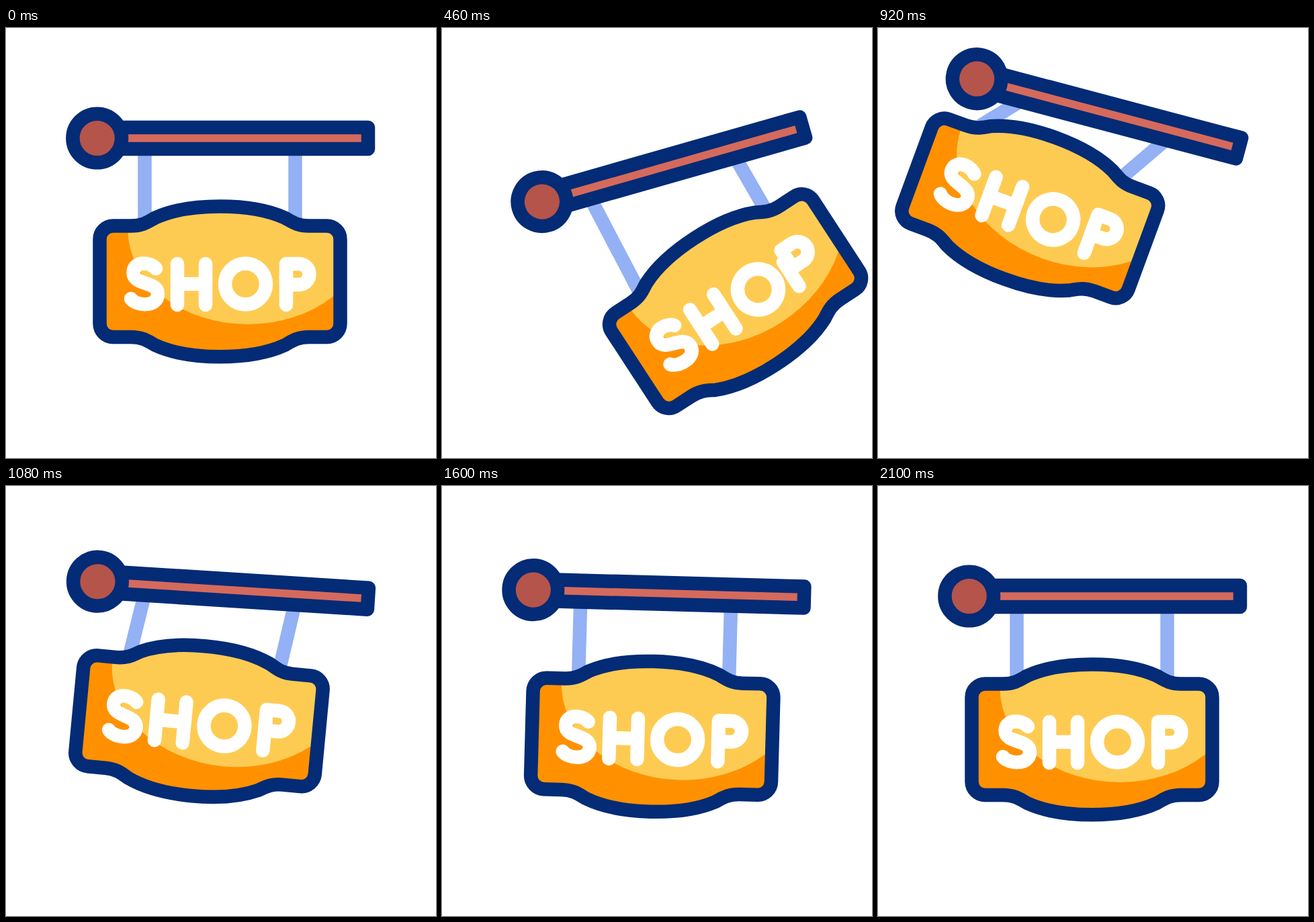
An HTML page for the animation above (2400 ms loop, 640 px wide and 640 px high).

```html
<!DOCTYPE html>
<html lang="en">
<head>
<meta charset="utf-8">
<title>Swinging shop sign</title>
<style>
  html, body { margin: 0; width: 100%; height: 100%; overflow: hidden; background: #fff; }
  svg { display: block; width: 100%; height: 100%; }
  .line { stroke: #042b76; stroke-width: 20.5; stroke-linejoin: round; }
  .rod { stroke: #93b1f4; stroke-width: 20.5; }
  .ink { fill: none; stroke: #fff; stroke-width: 20.5; stroke-linecap: round; stroke-linejoin: round; }
</style>
</head>
<body>
<svg viewBox="0 0 640 640">
  <defs>
    <path id="board" d="M159.5 294.5H186C204 294.5 212 288 222 282.5C272 259.8 365 259.8 415 282.5C425 288 433 294.5 451 294.5H477.5a20 20 0 0 1 20 20V440a20 20 0 0 1-20 20H451C433 460 425 466.5 415 472C365 495 272 495 222 472C212 466.5 204 460 186 460H159.5a20 20 0 0 1-20-20V314.5a20 20 0 0 1 20-20Z"/>
    <clipPath id="inside"><use href="#board"/></clipPath>
  </defs>
  <g id="dots" fill="#fecb52"><circle/><circle/><circle/></g>
  <g id="sign">
    <line class="rod"/>
    <line class="rod"/>
    <path class="line" fill="#d56a5c" d="M150 148H539V180H150Z"/>
    <circle class="line" fill="#b5544a" cx="135.7" cy="164" r="36.3"/>
    <g id="panel">
      <use href="#board" fill="#ff9100"/>
      <ellipse cx="360" cy="301" rx="178.5" ry="140" fill="#fecb52" clip-path="url(#inside)"/>
      <use href="#board" class="line" fill="none"/>
      <g class="ink">
        <path d="M223 358C215 348 190 346 189.5 364C189.5 384 226 376 226 396C226 416 194 414 186 403"/>
        <path d="M255 351V412M297 351V412M255 381H297"/>
        <circle cx="356.5" cy="381" r="30.5"/>
        <path d="M417 351H436a15.5 15.5 0 0 1 0 31H417Z"/>
        <path id="stem" d="M417 369V412"/>
      </g>
    </g>
  </g>
</svg>
<script>
const LOOP = 2400;
const HUB = [318.5, 377.5];
const get = id => document.getElementById(id);
const rods = document.querySelectorAll('.rod');
const dots = get('dots').children;

// Keys are [time, ...values], joined by sine easing.
const swing = [[0, 0], [436, 16.2], [860, -16], [1284, 7.2], [1750, -4.2], [2100, 0]];
const hang = [[0, 0, 0, 0], [400, 59, 11, -18.3], [840, -64, -53, 6], [1220, 0, 0, 0]];
const slip = [[340, 0], [620, 1], [860, 0]];
const sparks = [[50, -58], [80, -31.5], [86.5, -0.5]];

function sample(keys, t) {
  const i = keys.findIndex(k => k[0] > t);
  if (i < 1) return keys.at(i).slice(1);
  const a = keys[i - 1], b = keys[i];
  const e = (1 - Math.cos(Math.PI * (t - a[0]) / (b[0] - a[0]))) / 2;
  return a.slice(1).map((v, j) => v + (b[j + 1] - v) * e);
}

function set(el, attrs) {
  for (const name in attrs) el.setAttribute(name, attrs[name]);
}

function draw(t) {
  const [angle] = sample(swing, t);
  const [dx, dy, turn] = sample(hang, t);
  const [k] = sample(slip, t);
  set(get('sign'), { transform: `rotate(${-angle} 480.5 164)` });
  set(get('panel'), { transform: `translate(${dx} ${dy}) rotate(${turn} ${HUB})` });
  set(get('stem'), { transform: `translate(${-17 * k} ${-4 * k})` });

  // Each rod joins a fixed point on the bar to one on the panel.
  const c = Math.cos(turn * Math.PI / 180), s = Math.sin(turn * Math.PI / 180);
  [-112, 112].forEach((x, i) => set(rods[i], {
    x1: HUB[0] + x, y1: 180,
    x2: HUB[0] + dx + x * c + 90 * s,
    y2: HUB[1] + dy + x * s - 90 * c
  }));

  const p = Math.min(1, Math.max(0, (t - 1120) / 300));
  const reach = 1.56 * (1 - (1 - p) ** 2);
  const r = p > 0 ? 10.8 * Math.min(1, 2 * (1 - p)) : 0;
  sparks.forEach(([x, y], i) => set(dots[i], { cx: 490 + x * reach, cy: 290 + y * reach, r }));
}

const start = performance.now();
function frame() {
  draw((performance.now() - start) % LOOP);
  requestAnimationFrame(frame);
}
frame();
</script>
</body>
</html>
```
